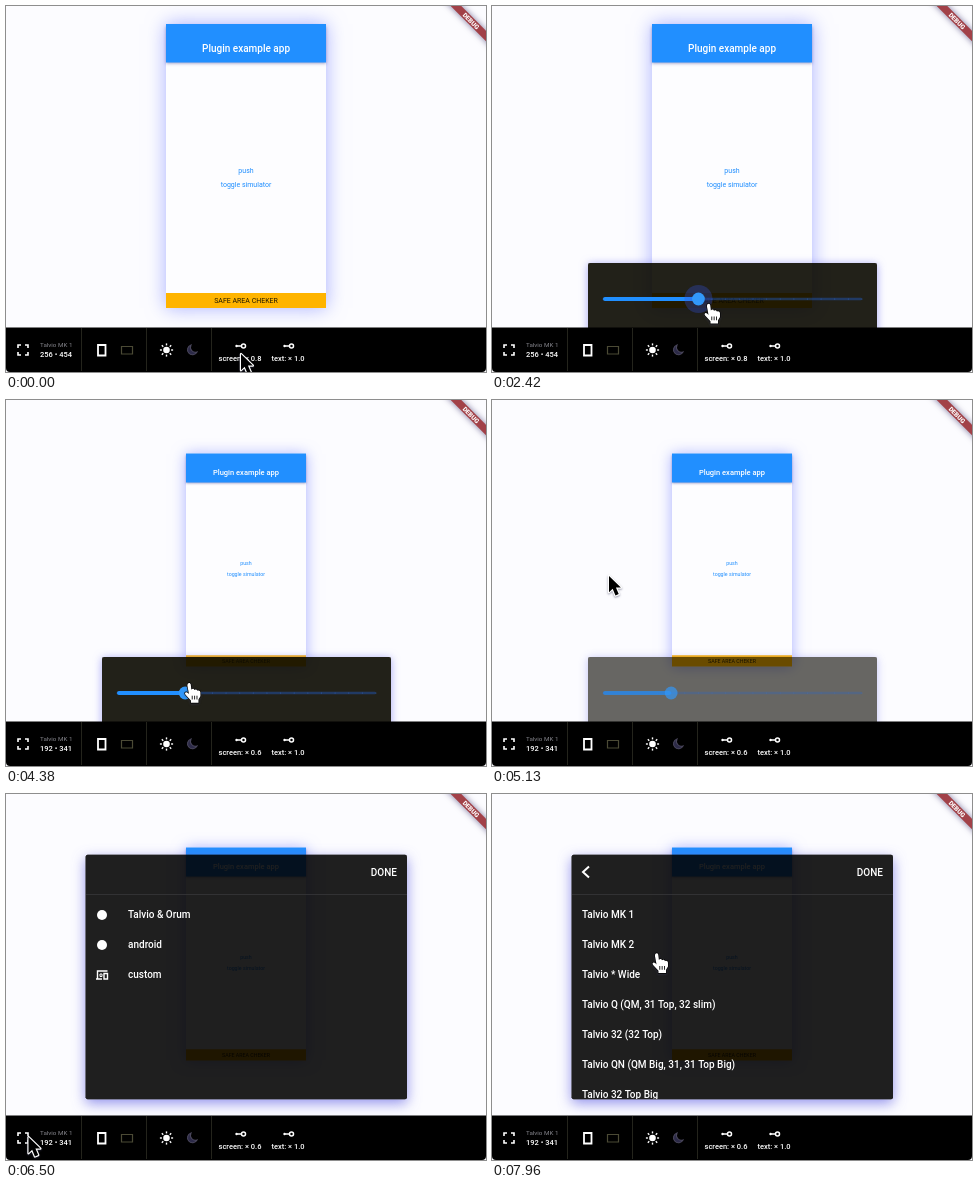
Write an HTML page with a canvas that moves like this. It is 480 by 366 pixels and loops after 8 s.

```html
<!DOCTYPE html>
<html lang="en">
<head>
<meta charset="utf-8">
<title>Device simulator</title>
<style>
html, body { margin: 0; width: 100%; height: 100%; overflow: hidden; background: #fcfcff; }
canvas { display: block; width: 480px; height: 366px; }
</style>
</head>
<body>
<canvas id="stage"></canvas>
<script>
const LOOP = 8000, BLUE = '#218fff';
const canvas = document.getElementById('stage');
const ctx = canvas.getContext('2d');
const dpr = window.devicePixelRatio || 1;
canvas.width = 480 * dpr;
canvas.height = 366 * dpr;

const clamp = v => Math.min(1, Math.max(0, v));
const ramp = (t, from, to) => clamp((t - from) / (to - from));
const ease = v => v * v * (3 - 2 * v);
const mix = (a, b, v) => a + (b - a) * v;
const within = (t, from, to) => t >= from && t < to;

// Pointer path: time, x, y
const pointerPath = [
  [0, 235, 348], [900, 235, 348], [1500, 238, 341], [1850, 238, 341],
  [2350, 212, 297], [2480, 212, 297], [3550, 187, 297], [4250, 187, 297],
  [4850, 117, 176], [5200, 117, 176], [5800, 22.5, 343], [6550, 22.5, 343],
  [7150, 142, 119], [7420, 142, 119], [7880, 160, 158.5], [LOOP, 160, 158.5]
];

function pointerAt(t) {
  const i = pointerPath.findIndex(k => k[0] > t);
  const [a, b] = [pointerPath[i - 1], pointerPath[i]];
  const v = ease(ramp(t, a[0], b[0]));
  return [mix(a[1], b[1], v), mix(a[2], b[2], v)];
}

const deviceMenu = ['Talvio & Orum', 'android', 'custom'];
const models = ['Talvio MK 1', 'Talvio MK 2', 'Talvio * Wide', 'Talvio Q (QM, 31 Top, 32 slim)',
  'Talvio 32 (32 Top)', 'Talvio QN (QM Big, 31, 31 Top Big)', 'Talvio 32 Top Big'];

function group(alpha, draw) {
  if (alpha <= 0) return;
  ctx.save();
  ctx.globalAlpha *= alpha;
  draw();
  ctx.restore();
}

function text(str, x, y, size, color = '#fff', weight = 400, align = 'left') {
  ctx.font = `${weight} ${size}px Roboto, sans-serif`;
  ctx.textAlign = align;
  ctx.textBaseline = 'middle';
  ctx.fillStyle = color;
  ctx.fillText(str, x, y);
}

function rect(x, y, w, h, color, radius = 0) {
  ctx.beginPath();
  ctx.roundRect(x, y, w, h, radius);
  ctx.fillStyle = color;
  ctx.fill();
}

function disc(x, y, r, color) {
  ctx.beginPath();
  ctx.arc(x, y, r, 0, 7);
  ctx.fillStyle = color;
  ctx.fill();
}

function stroke(d, color = '#fff', width = 1.4) {
  ctx.strokeStyle = color;
  ctx.lineWidth = width;
  ctx.stroke(new Path2D(d));
}

function shadow(color, blur, dy, draw) {
  ctx.save();
  ctx.shadowColor = color;
  ctx.shadowBlur = blur * dpr;
  ctx.shadowOffsetY = dy * dpr;
  draw();
  ctx.restore();
}

// Translucent card whose shadow shows only outside its edges
function card(x, y, w, h, color, glow, blur, dy) {
  ctx.save();
  ctx.beginPath();
  ctx.rect(0, 0, 480, 366);
  ctx.roundRect(x, y, w, h, 2);
  ctx.clip('evenodd');
  shadow(glow, blur, dy, () => rect(x, y, w, h, '#222', 2));
  ctx.restore();
  rect(x, y, w, h, color, 2);
}

function phone(scale) {
  const k = scale / 0.8;
  ctx.save();
  ctx.translate(240, 160.3);
  ctx.scale(k, k);
  ctx.translate(-240, -160.3);
  shadow('rgba(140,150,255,.75)', 18 * k, 0, () => rect(160, 18, 160, 284, '#fdfdff'));
  shadow('rgba(70,70,150,.5)', 3 * k, 1.5 * k, () => rect(160, 18, 160, 38.5, BLUE));
  text('Plugin example app', 240, 43, 10, '#fff', 500, 'center');
  text('push', 240, 164.5, 7, BLUE, 400, 'center');
  text('toggle simulator', 240, 179, 7, BLUE, 400, 'center');
  rect(160, 287, 160, 15, '#ffb400');
  text('SAFE AREA CHEKER', 240, 294.7, 7, '#201800', 400, 'center');
  ctx.restore();
}

function debugBanner() {
  ctx.save();
  ctx.translate(465, 15);
  ctx.rotate(Math.PI / 4);
  shadow('rgba(40,30,90,.6)', 6, 0, () => rect(-40, -3.75, 80, 7.5, '#a24148'));
  text('DEBUG', 0, 0.4, 6.4, '#fff', 900, 'center');
  ctx.restore();
}

const sliderX = scale => 111 + 259 * (scale - 0.1) / 1.9;

function sliderPanel(t) {
  const thumb = sliderX(0.8 - 0.1 * ramp(t, 3030, 3105) - 0.1 * ramp(t, 3525, 3600));
  card(96, 257, 289, 75, 'rgba(10,9,0,.9)', 'rgba(110,110,240,.6)', 9, 1);
  rect(111, 291.7, 259, 2.6, 'rgba(33,100,220,.38)', 1.3);
  for (let s = 1; s <= 20; s++) disc(sliderX(s / 10), 293, 0.6, 'rgba(60,120,230,.5)');
  rect(111, 291, thumb - 111, 4, BLUE, 2);
  const glow = ramp(t, 2360, 2420) * (1 - ramp(t, 3950, 4100));
  group(glow, () => disc(thumb, 293, 14, 'rgba(50,80,220,.32)'));
  disc(thumb, 293, 6.4, '#3298fa');
}

function dialog(t) {
  const page = ease(ramp(t, 7400, 7680));
  card(79.6, 60.7, 321.4, 244.6, 'rgba(0,0,0,.88)', 'rgba(110,110,230,.75)', 13, 4);
  rect(80, 100, 321, 0.8, '#39393b');
  text('DONE', 391, 78.6, 10, '#fff', 500, 'right');
  ctx.beginPath();
  ctx.rect(80, 61, 321, 244);
  ctx.clip();
  group(1 - page, () => {
    ctx.translate(-100 * page, 0);
    group(within(t, 7240, 7400) ? 0.4 : 1, () => {
      disc(96, 121, 5, '#fff');
      text(deviceMenu[0], 122, 121.4, 10, '#fff', 500);
    });
    disc(96, 151, 5, '#fff');
    stroke('M91.5 185V177H101.5M90 185H96M98 179.5H101.5V185H98Z');
    stroke('M94 180H96V182.5H94Z', '#fff', 1);
    text(deviceMenu[1], 122, 151.4, 10, '#fff', 500);
    text(deviceMenu[2], 122, 181.4, 10, '#fff', 500);
  });
  group(page, () => {
    stroke('M97 72.5L91 78L97 83.5', '#fff', 2);
    ctx.translate(321 * (1 - page), 0);
    models.forEach((name, i) => text(name, 90, 121.4 + 30 * i, 10, '#fff', 500));
  });
}

function tuneButton(x, label, pressed) {
  group(pressed ? 0.4 : 1, () => {
    stroke(`M${x - 4} 340H${x + 1.5}`, '#fff', 1.5);
    disc(x - 3.5, 340, 1.2, '#fff');
    ctx.beginPath();
    ctx.arc(x + 3.5, 340, 2, 0, 7);
    ctx.stroke();
  });
  text(label, x, 353, 7.5, '#fff', 500, 'center');
}

function toolbar(t, scale) {
  rect(0, 321.5, 480, 44.5, '#000', [0, 0, 4, 4]);
  for (const x of [75, 140, 205]) rect(x, 322, 1, 43, '#24241c');

  group(within(t, 5820, 5960) ? 0.4 : 1, () => {
    stroke('M12 342V339H15M19 339H22V342M22 346V349H19M15 349H12V346', '#fff', 1.6);
    text('Talvio MK 1', 34, 339, 6.25, '#85858c');
    text(`${Math.round(320 * scale)} • ${Math.round(568 * scale)}`, 34, 348.4, 7.5, '#fff', 500);
  });

  stroke('M92 339H99.5V349.5H92Z', '#fff', 1.8);
  stroke('M115.5 340.5H126.5V348H115.5Z', '#4b4a35', 1.2);

  disc(160.5, 344, 3.3, '#fff');
  for (let i = 0; i < 8; i++) {
    const a = i * Math.PI / 4, c = Math.cos(a), s = Math.sin(a);
    stroke(`M${160.5 + 4.6 * c} ${344 + 4.6 * s}L${160.5 + 6.6 * c} ${344 + 6.6 * s}`);
  }
  const moon = 'M185 339A5 5 0 1 0 191 346A5 5 0 0 1 185 339Z';
  ctx.fillStyle = '#2c2a48';
  ctx.fill(new Path2D(moon));
  stroke(moon, '#4a475c', 1.1);

  tuneButton(234, `screen: × ${scale.toFixed(1)}`, within(t, 1560, 1720));
  tuneButton(282, 'text: × 1.0', false);
}

const arrow = new Path2D('M0 0V15L3.4 11.8L6 18L9 16.7L6.4 10.7H11Z');
const hand = new Path2D('M3 1.5C4 0 5.6 .6 5.8 2L6.4 7C7 5.6 9 5.8 9.2 7.2' +
  'C10 6.2 11.8 6.6 12 8C13 7.2 14.8 7.8 14.8 9.6V13L13 16V19H6V17' +
  'L1 11.5C-.4 9.6 1.6 8.4 3.2 10L4.2 11L2.7 3Z');

function pointer(t) {
  const [x, y] = pointerAt(t);
  const overSlider = within(t, 1900, 5000) && within(y, 257, 318);
  const isHand = overSlider || t >= 7080;
  const shape = isHand ? hand : arrow;
  ctx.save();
  ctx.translate(x, y);
  ctx.scale(1.08, 1.08);
  ctx.lineJoin = 'round';
  ctx.lineWidth = isHand ? 1.2 : 2.2;
  ctx.strokeStyle = isHand ? '#000' : '#fff';
  ctx.fillStyle = isHand ? '#fff' : '#000';
  shadow('rgba(60,60,90,.5)', 2, 1, () => ctx.stroke(shape));
  ctx.fill(shape);
  if (isHand) stroke('M7.2 12.5V16M9.4 12.5V16M11.6 12.5V16', '#000', 0.8);
  ctx.restore();
}

function frame(now) {
  const t = now % LOOP;
  const scale = t < 3030 ? 0.8 : t < 3525 ? 0.7 : 0.6;
  ctx.setTransform(dpr, 0, 0, dpr, 0, 0);
  rect(0, 0, 480, 366, '#fcfcff');
  phone(scale);
  debugBanner();
  group(ramp(t, 1740, 1900) * (1 - ramp(t, 5070, 5260)), () => sliderPanel(t));
  group(ramp(t, 5940, 6120), () => dialog(t));
  toolbar(t, scale);
  pointer(t);
  requestAnimationFrame(frame);
}
requestAnimationFrame(frame);
</script>
</body>
</html>
```
